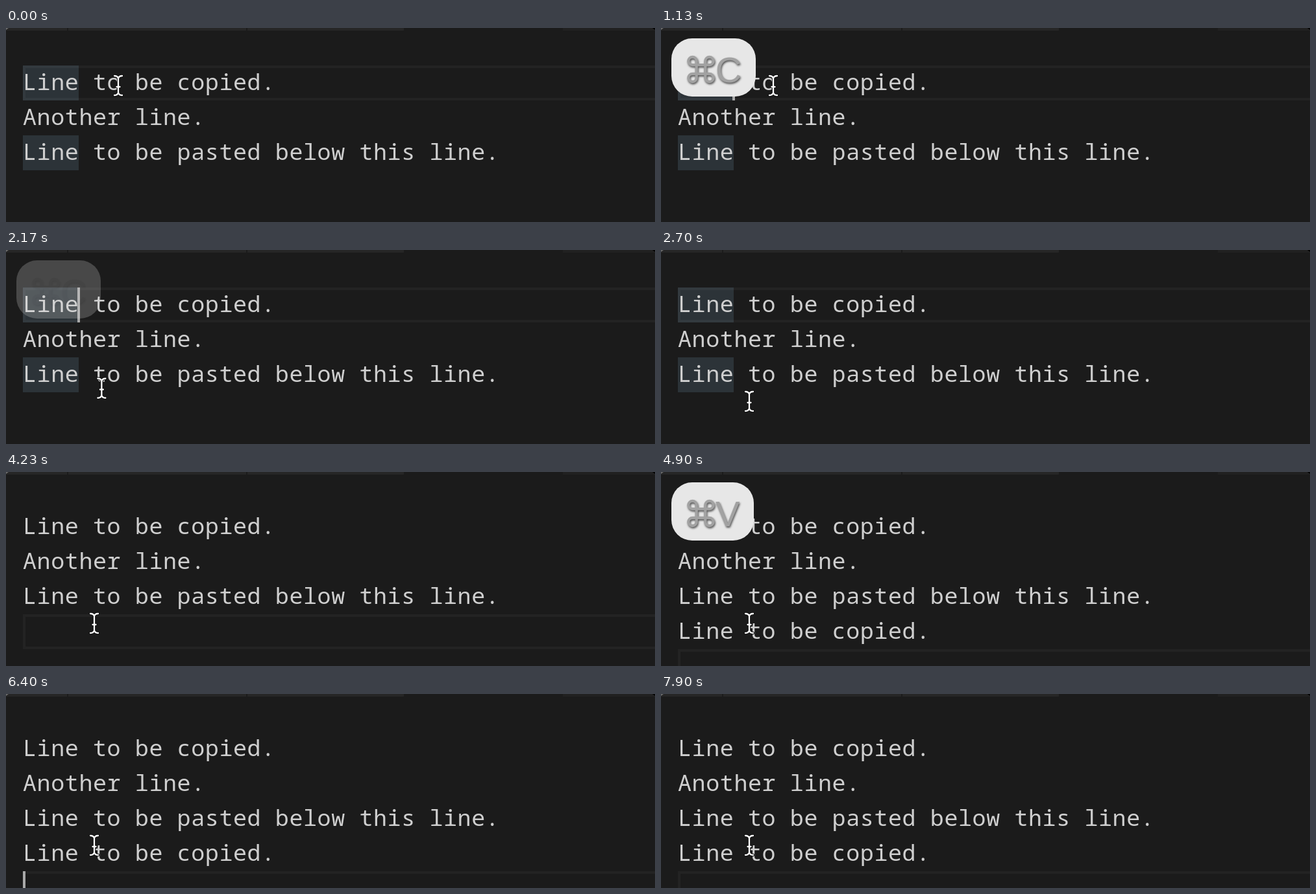
Recreate the animation shown at these times as an HTML page. Size 1000 px wide and 300 px high, loop 8.13 s.

```html
<!DOCTYPE html>
<html lang="en">
<head>
<meta charset="utf-8">
<title>Copy and paste a line</title>
<style>
  html, body { margin: 0; width: 100%; height: 100%; overflow: hidden; background: #1b1b1b; }
  svg { display: block; width: 100vw; height: 100vh; }
  .code { font: 35px "Noto Sans Mono", "DejaVu Sans Mono", monospace; letter-spacing: .6px; fill: #cfcfcf; }
  #glyphs { filter: drop-shadow(1px 2px 1.5px rgba(0, 0, 0, .65)); }
  #glyphs text { font: 56px "Liberation Sans", Arial, sans-serif; fill: #a2a2a2; }
  .beam { fill: none; stroke-linecap: round; stroke-linejoin: round; }
</style>
</head>
<body>
<svg viewBox="0 0 1000 300">
  <rect width="1000" height="300" fill="#1b1b1b"/>
  <path d="M0 0H94V4H0ZM96 0H370V4H96ZM372 0H613V4H372Z" fill="#262626"/>
  <path d="M858 0H1000V4H858Z" fill="#212121"/>
  <path d="M0 0H4L0 3Z" fill="#6a6a6a"/>
  <path d="M1000 0H996L1000 3Z" fill="#000"/>

  <g id="matches" fill="#2c3338">
    <rect x="26" y="58" width="86" height="54"/>
    <rect x="26" y="166" width="86" height="54"/>
  </g>
  <rect id="row" x="28" width="1100" height="50" fill="none" stroke="#fff" stroke-opacity=".035" stroke-width="4"/>

  <g class="code">
    <text x="26" y="96">Line to be copied.</text>
    <text x="26" y="150">Another line.</text>
    <text x="26" y="204">Line to be pasted below this line.</text>
    <text id="pasted" x="26" y="258">Line to be copied.</text>
  </g>
  <rect id="caret" width="4" height="54" fill="#a9a9a9"/>

  <g id="key">
    <rect id="cap" x="16" y="16" height="90" rx="32" fill="#e7e7e7"/>
    <g id="glyphs">
      <path transform="translate(61.5 64)" fill="none" stroke="#a2a2a2" stroke-width="4.2"
        d="M-6.8-13A6.2 6.2 0 1 0-13-6.8H13A6.2 6.2 0 1 0 6.8-13V13A6.2 6.2 0 1 0 13 6.8H-13A6.2 6.2 0 1 0-6.8 13Z"/>
      <text id="letter" x="84" y="84"></text>
    </g>
  </g>

  <g id="mouse" class="beam">
    <path id="beam" stroke="#111" stroke-width="4.4"
      d="M-6-15Q-1-15 0-11Q1-15 6-15M0-11V11M-6 15Q-1 15 0 11Q1 15 6 15M-2.5 2H2.5"/>
  </g>
</svg>
<script>
const LOOP = 8130, CLICK = 2770, PASTE = 4400;
const $ = id => document.getElementById(id);
const set = (id, attrs) => {
  for (const name in attrs) $(id).setAttribute(name, attrs[name]);
};
const show = (id, on) => set(id, { visibility: on ? "visible" : "hidden" });
const clamp = v => Math.min(1, Math.max(0, v));
const span = (t, from, to) => clamp((t - from) / (to - from));
const smooth = p => p * p * (3 - 2 * p);

// The white beam lies on a dark copy that forms its outline.
const white = $("beam").cloneNode();
white.removeAttribute("id");
white.setAttribute("stroke", "#fff");
white.setAttribute("stroke-width", 2.3);
$("mouse").append(white);

const keys = [
  { letter: "C", width: 130, from: 1130, end: 2212 },
  { letter: "V", width: 127, from: 4430, end: 5480 }
];

function drawKey(t) {
  const key = keys.find(k => t >= k.from && t < k.end);
  show("key", key);
  if (!key) return;
  const opacity = clamp((key.end - t) / 190);
  set("cap", { width: key.width });
  $("letter").textContent = key.letter;
  // The glyphs fade with the key and also lose contrast against it.
  set("key", { opacity });
  set("glyphs", { opacity });
}

function drawCaret(t) {
  const [x, y, start] =
    t < CLICK ? [110, 58, 30] :
    t < PASTE ? [26, 220, 2730] : [26, 274, PASTE];
  set("row", { y: y + 2 });
  set("caret", { x, y });
  show("caret", (t - start + 1000) % 1000 < 500);
}

function drawMouse(t) {
  const p = span(t, 1740, 2310), settle = smooth(span(t, 2570, 2700));
  const x = 173 - 34 * p - 3 * settle;
  const y = 89 + 147 * smooth(p) - 2 * settle;
  set("mouse", { transform: `translate(${x} ${y})` });
}

function draw(time) {
  // Motion steps at 30 frames a second, timed to 10 ms.
  const step = Math.floor((time % LOOP + 3.4) * 0.03);
  const t = Math.round(step / 0.3) * 10 % LOOP;
  show("matches", t < 2800);
  show("pasted", t >= PASTE);
  drawCaret(t);
  drawKey(t);
  drawMouse(t);
}

function tick() {
  draw(performance.now());
  requestAnimationFrame(tick);
}
tick();
</script>
</body>
</html>
```
